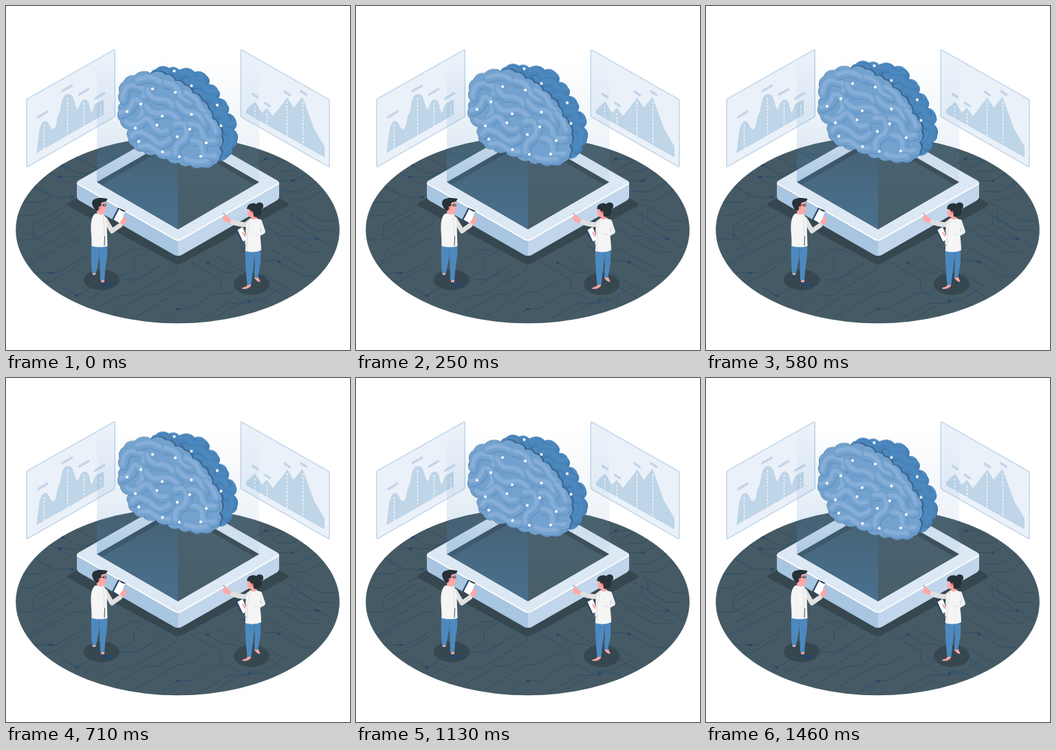
An HTML page that plays this animation: 500 by 500 pixels, repeating every 1.5 s.

```html
<!DOCTYPE html>
<html lang="en">
<head>
<meta charset="utf-8">
<title>Brain hologram</title>
<style>
html, body { margin: 0; width: 100%; height: 100%; overflow: hidden; background: #fff; }
svg { display: block; width: 100%; height: 100%; }
.line { fill: none; stroke-linecap: round; stroke-linejoin: round; }
.dash { stroke: #fff; stroke-width: 1.2; stroke-dasharray: 3 2.2; fill: none; }
.bar { stroke: #c3d7ea; stroke-width: 3.6; }
</style>
</head>
<body>
<svg viewBox="0 0 500 500">
  <defs>
    <linearGradient id="beamL" gradientUnits="userSpaceOnUse" x1="0" y1="75" x2="0" y2="323">
      <stop offset="0" stop-color="#4d89bf" stop-opacity="0"/>
      <stop offset=".5" stop-color="#4d89bf" stop-opacity=".16"/>
      <stop offset=".75" stop-color="#4d89bf" stop-opacity=".34"/>
      <stop offset="1" stop-color="#4d89bf" stop-opacity=".46"/>
    </linearGradient>
    <linearGradient id="beamR" gradientUnits="userSpaceOnUse" x1="0" y1="75" x2="0" y2="323">
      <stop offset="0" stop-color="#6f9fcc" stop-opacity="0"/>
      <stop offset=".5" stop-color="#6f9fcc" stop-opacity=".12"/>
      <stop offset="1" stop-color="#6f9fcc" stop-opacity=".06"/>
    </linearGradient>
    <clipPath id="floorClip"><ellipse cx="249.5" cy="325.500" rx="235.300" ry="135.800"/></clipPath>
    <clipPath id="frontClip"><path id="frontClipPath"/></clipPath>
    <clipPath id="rearClip"><path id="rearClipPath"/></clipPath>
  </defs>

  <ellipse cx="249.5" cy="325.5" rx="235.300" ry="135.800" fill="#455a64"/>
  <g clip-path="url(#floorClip)">
    <g id="circuit" class="line" stroke="#2c4c6c" stroke-width=".9"></g>
    <g id="nodes" fill="#28466a"></g>
  </g>

  <!-- wall panels -->
  <g stroke-linejoin="round">
    <g fill="#ebf1f9" stroke="#b3cee6" stroke-width="1.2">
      <path d="M30 137q0-1.500 1.300-2.300L156.500 64q1.800-1 1.800 1v94q0 1.700-1.300 2.500L31.500 233.500q-1.500.8-1.500-1z"/>
      <path d="M341.200 65q0-2 1.800-1L468.700 135.500q1.300.8 1.300 2.500v94.500q0 1.800-1.500 1L342.500 161.500q-1.300-.8-1.300-2.500z"/>
    </g>
    <path fill="#bfd5e8" d="M44 214c2-9 2-18 4-29 1-11 5-18 9-18 6 0 6 11 11 12 6 0 5-15 8-20 5-7 3-31 14-31 10 0 8 13 13 21 3 5 3-12 11-13 8 0 7 12 10 18 2 4 3-12 8-13 5-2 8-5 10-4v21z"/>
    <path fill="#bfd5e8" d="M349 156v-5l13-12 10 16 7-7 9 12 21-27 9 15 13-16 17 47 15 25v16z"/>
    <path class="dash" d="M55.500 173v35M89.500 134v53M113.500 141v33M138 145v15M361.500 146v17M379.500 156v17M408.500 139v51M431.500 139v63"/>
    <path class="line bar" d="M47 161.500l13-8M82 123.500l13.500-7.500M106.500 128.500l13-7.500M129.500 134.500l13-7.500M358.500 128l7 4.500M376.500 141l7 4.500M405 124.500l7.500 5M429 124l7.500 5"/>
  </g>

  <!-- platform -->
  <g stroke-linejoin="round">
    <path fill="#36474f" d="M91 286L250 196l159 90q3 3 0 5L256 373.500q-6 3-12 0L91 291q-3-2 0-5z"/>
    <path fill="#a8c5e1" d="M103 257L250 341v22q-3 .3-6-1.500L107 283q-4-2.500-4-6z"/>
    <path fill="#c1d6eb" d="M397 257L250 341v22q3 .3 6-1.500L393 283q4-2.500 4-6z"/>
    <path fill="#dce8f3" d="M105 254L245 174q5-2.500 10 0L395 254q4 3 0 6L255 340q-5 2.500-10 0L105 260q-4-3 0-6z"/>
    <path class="line" stroke="#fff" stroke-width="1.500" d="M103.500 258L246 339.500q4 2 8 0L396.500 258"/>
    <path fill="#37474f" d="M132 256L250 188l118 68L250 324.500z"/>
    <path fill="#455a64" d="M139 260L250 196l111 64L250 324.500z"/>
  </g>

  <!-- projected light -->
  <path fill="url(#beamL)" d="M132 75h118v249.500L132 256z"/>
  <path fill="url(#beamR)" d="M368 75H250v249.500L368 256z"/>

  <g id="brain">
    <path id="rear" fill="#4d89bf"/>
    <g clip-path="url(#rearClip)">
      <g id="rearFolds"></g>
      <use href="#front" fill="#3a6797" transform="translate(2.200 -1.200)"/>
    </g>
    <path id="front"/>
    <g clip-path="url(#frontClip)" id="frontFolds"></g>
    <g id="dots" fill="#fff"></g>
  </g>

  <!-- man -->
  <g>
    <ellipse cx="139" cy="398" rx="26" ry="15" fill="#36474f"/>
    <path fill="#ffa8a7" d="M126 384h4.500v6q-2.500 2-5 1zM138 394h5v7q-2 1.500-5 0z"/>
    <path fill="#28466a" d="M125 390q3 2 5.500 1l-.5 1.500q-3 1-5.500 0zM138 402q3 1 5 0 5 1 13 4 1 2-3 2.500-8 0-15-2.500z"/>
    <path fill="#4d89bf" d="M124 346h23.500q0 20-2.500 30l-2 22q-3 1.500-6 0l-1-36-5 26q-3 1-6 0-2-22-1-42z"/>
    <path class="line" stroke="#3f75a8" d="M136 350l-.5 16" stroke-width=".9"/>
    <path fill="#28466a" d="M163 293l11 5-8 19.500-12-7z"/>
    <path fill="#fff" d="M164.500 295l9 4-7 17.500-10-6z"/>
    <path class="line" stroke="#263238" stroke-width="1.800" d="M167 296l4 2"/>
    <path fill="#ffa8a7" d="M165 318q0-5 4-8l4-4q2 0 1 2 2 1 1 4-1 5-7 8z"/>
    <path class="line" stroke="#e0e0e0" stroke-width="7" d="M144 310l10 17 11.500-8"/>
    <path fill="#f5f5f5" d="M129 302q8-2 13 0 4 6 4.500 16l1 31q-10 3-23 0 0-12-1-22-1-19 5.500-25z"/>
    <path class="line" stroke="#cfd8dc" stroke-width=".8" d="M141 303l1.500 15v16"/>
    <path class="line" stroke="#263238" stroke-width=".9" d="M143.500 335l-.5 13"/>
    <path fill="#ffa8a7" d="M132 294l9 6q1 4-4 3-5-1-5-3zM132 287q4-4 12-3 1.500 5 1 10 0 7-4 7-7-1-9-7z"/>
    <path fill="#263238" d="M125 287q0-6 6-7 6-2 12-.5 3-.5 4.500 1-1 4-5.500 4.500-4 0-4 4l-1 3-2-1v5l-3 2q-5-3-7-11z"/>
    <path class="line" stroke="#263238" stroke-width=".8" d="M138 289.500h4M142 288h3v2.800h-3z"/>
    <path fill="#ed847e" d="M135.500 291q3 0 2 4-2.500 1-3-1z"/>
  </g>

  <!-- woman -->
  <g>
    <ellipse cx="357" cy="404" rx="26" ry="16" fill="#36474f"/>
    <path fill="#ffa8a7" d="M351 401h5v6q-2 5-12 5-2-2 1-3 5-1 6-4zM362 391l4 2 3 6q1 3-2 2-4-2-6-5z"/>
    <path class="line" stroke="#28466a" stroke-width=".8" d="M343 411.500q8 1 13-4M361 396q3 5 7 5.500"/>
    <path fill="#4d89bf" d="M347.500 352H370q.5 17-.5 25l-3.500 18q-3 1-5-1l1-20-1-8-4.500 38q-3 2.500-6 1-3-29-3-53z"/>
    <path class="line" stroke="#3f75a8" stroke-width=".9" d="M361 358v10"/>
    <path fill="#28466a" d="M333.500 326l10-6 8 20-8 4z"/>
    <path fill="#fff" d="M336.500 325.500l7.500-4.500 7 18-6.500 3.500z"/>
    <path class="line" stroke="#37474f" stroke-width=".9" d="M316 301.500l5 5"/>
    <path fill="#ffa8a7" d="M316 305q2-3 5 0l5 4 1 5q-3 2-6 0-5-1-6-4z"/>
    <path class="line" stroke="#e0e0e0" stroke-width="7" d="M356 312l-8 6q-10-.5-18.500-4"/>
    <path class="line" stroke="#eceff1" stroke-width="6" d="M369 313l5 15-11 6"/>
    <path class="line" stroke="#b0bec5" stroke-width=".7" d="M367 313l3 12-4 8"/>
    <path fill="#ffa8a7" d="M347 331l-3-3-1 1 3 6 3 1z"/>
    <path fill="#f5f5f5" d="M356 309q8-2 12 1 3 9 1 20 2 17 2 25-11 5-24 1 0-16 2-23-3-15 7-24z"/>
    <path class="line" stroke="#cfd8dc" stroke-width=".8" d="M355 311l-4 18-1 28M360 331l7 2"/>
    <path class="line" stroke="#263238" stroke-width=".9" d="M348 346l-1 11"/>
    <path fill="#ffa8a7" d="M358 301l7 7q-2 3-8 2l-1-5zM351 295q5-3 10 0 1 9-4 12-5 0-6-4z"/>
    <path fill="#263238" d="M350 295q0-8 10-8.500 2 0 4 1.500 1-3 5-2.500 5 .5 5 5 0 4-3 5 2 5-2 9-4 3-9 1.500l-1-7-3 1q0-5-6-5z"/>
    <path fill="#ed847e" d="M356 299q3-2 3 1 0 3-3 3z"/>
  </g>
</svg>
<script>
const NS = 'http://www.w3.org/2000/svg';
const $ = id => document.getElementById(id);

function add(parent, tag, attrs) {
  const el = document.createElementNS(NS, tag);
  for (const k in attrs) el.setAttribute(k, attrs[k]);
  return parent.appendChild(el);
}

const points = text => text.split(' ').map(p => p.split(',').map(Number));

// Closed outline of rounded lobes through the given points.
function lobes(text) {
  const pts = points(text);
  return 'M' + pts[0] + pts.map((p, i) => {
    const q = pts[(i + 1) % pts.length];
    const r = Math.hypot(q[0] - p[0], q[1] - p[1]) * .75;
    return `A${r} ${r} 0 0 1 ${q}`;
  }).join('') + 'Z';
}

// Each fold is a broad ridge with a soft edge and a lighter crest.
function folds(group, list, shade, body, light) {
  const ridge = (d, stroke, width, shift) => add(group, 'path',
    { d, class: 'line', stroke, 'stroke-width': width, transform: `translate(${shift} ${shift})` });
  for (const d of list) {
    ridge(d, shade, 14, 1);
    ridge(d, body, 13, 0);
    ridge(d, light, 6, -1);
  }
}

const front = lobes('165,126 171,110 187,101 211,98 232,100 246,109 259,115 271,127 284,138 294,150 299,164 308,174 313,190 310,206 311,219 302,230 285,234 268,231 251,228 234,222 218,215 199,211 185,204 178,192 178,179 166,167 164,152 167,141');
const rear = lobes('210,100 218,92 237,90 252,93 274,96 291,101 295,114 308,122 309,134 322,144 322,156 334,167 331,180 336,196 328,206 323,219 306,224 290,204 270,150 240,115');
for (const id of ['front', 'frontClipPath']) $(id).setAttribute('d', front);
for (const id of ['rear', 'rearClipPath']) $(id).setAttribute('d', rear);
$('brain').insertBefore(add($('brain'), 'use', { href: '#front', fill: '#73a2cf' }), $('frontFolds'));

folds($('rearFolds'), [
  'M218 96q12-4 18 4t14 4', 'M254 98q12-4 16 4t18 3', 'M270 114q14-4 20 5t16 5',
  'M288 134q14-4 18 7t12 8', 'M304 157q14-3 16 8t12 6', 'M316 180q14 0 13 13t-9 18'
], '#3f75aa', '#4883b9', '#4d89bf');

folds($('frontFolds'), [
  'M170 136q2-24 20-19t10 16', 'M192 108q16-7 28 0t18 7', 'M168 156q14-4 16-14t12-2q8 14-2 24',
  'M206 122q4 14 18 14t20 10', 'M232 112q16 2 20 14t20 14', 'M262 126q14 6 18 16t12 14',
  'M204 146q8 14 22 10t24 8', 'M250 142q8 14 22 14t16 20', 'M176 170q12 8 22-2t18 8q6 10 18 6',
  'M184 190q6-10 18-4t16 12q10 6 20-4', 'M196 205q12-4 20 4t22 6', 'M246 172q15-4 17 8t-8 18q-10 4-8 18',
  'M268 172q16 0 18 14t18 10', 'M272 196q14 0 14 14t18 8', 'M262 223q12 6 30 3', 'M292 160q10 8 14 24'
], '#6291c4', '#73a2cf', '#87aed8');

const place = (id, text, shape, size) => {
  for (const [cx, cy] of points(text)) add($(id), shape, { cx, cy, ...size });
};
place('dots', '244.5,94.5 269.500,116 213,120.500 246,125.500 196,142.500 307,144 176,153.500 227,160 269.500,157.500 188,177.500 219.500,173 312.500,174 267,179 249,190 193,197 291,199 227.500,212 252,219 283,218.500', 'circle', { r: 2.1 });
place('nodes', '79,248 96,278 65,388 103,421 250,440.500 354,429.500 397,372 293,373 452.500,338 417,254 378,222 82,231.500', 'ellipse', { rx: 2.9, ry: 1.7 });

for (const d of [
  'M79 248h32l14-8M82 231l22 12h16l18-10M96 278H72l-44-25M40 262l26 15-12 8h-34',
  'M116 290H88l-48 28v20M88 299l-42 24M20 305h18l22-12M100 306l-58 34H18M112 316l-68 39M34 330l20 12',
  'M65 388H42l-14-8M114 340H98l-64 37M118 362l-44 26h-14M66 354l-42 24M106 376l-40 24H54',
  'M103 421l28-16h17l38-22v-16l28-16M103 421l-22-13M116 428l52-30h20l42-24M150 372l32-18h16l20-12',
  'M134 438l30-17h18l66-38v-8M158 446l46-27h16l34-20M188 452l62-36h14l28-16M180 405l32-19',
  'M250 440h16l38-22h20l24-14M250 440l-24 14M282 456l42-24h30M306 452l46-26h20l28-16',
  'M293 373l24 14h18l18 11M268 372l44 26v14l28 16M306 364l46 27h24l36 21M336 348l38 22h23',
  'M397 372l34 20h20M380 350l54 31M354 429h22l36 20M378 406l40 24M390 332l42 25h28M372 318l28 16h18l32 19',
  'M452 338h-18l-44-25M474 350l-58-34v-14M480 312h-22l-46-27M476 326h-26l-26-15v-16M404 297l44 26',
  'M417 254h-28l-14-8M417 254l42-24M402 270h24l40-23M470 262l-34 20h-22M378 222l-20 11M378 222h20l22-13',
  'M394 240h22l26-15M360 214l18-11M384 236l26-15M152 214l22 13M130 208l28 16M100 218l32 18M60 240l36 20'
]) add($('circuit'), 'path', { d });

$('brain').animate(
  [0, -10, 0].map(y => ({ transform: `translateY(${y}px)` })),
  { duration: 1500, iterations: Infinity, easing: 'linear' }
);
</script>
</body>
</html>
```
